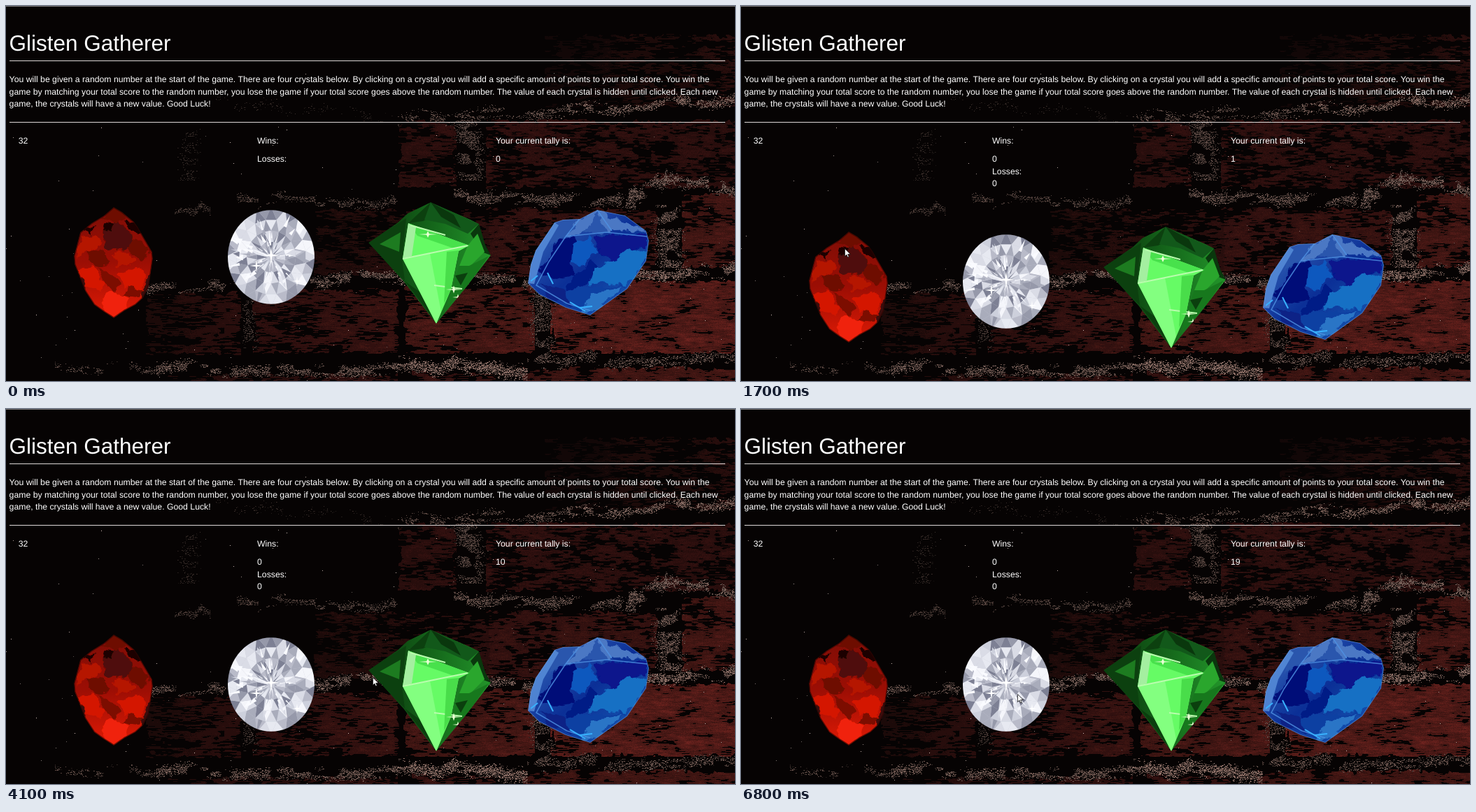
Recreate the animation shown at these times as an HTML page with a canvas. Size 1042 px wide and 537 px high, loop 8000 ms.

```html
<!DOCTYPE html>
<html lang="en">
<head>
<meta charset="utf-8">
<title>Glisten Gatherer</title>
<style>
  html, body { margin: 0; width: 100%; height: 100%; overflow: hidden; background: #060303; }
  canvas, svg { position: absolute; left: 0; top: 0; width: 1042px; height: 537px; }
  text { font: 12.25px "Liberation Sans", Arial, sans-serif; fill: #fff; text-rendering: geometricPrecision; }
  .title { font-size: 31.5px; }

  .early, .late, .one, .ten, .nineteen, #gems, #cursor { animation: 8s step-end -5ms infinite; }
  .early { animation-name: early; }
  .late { animation-name: late; }
  .one { animation-name: one; }
  .ten { animation-name: ten; }
  .nineteen { animation-name: nineteen; }
  #gems { animation-name: drop; }
  #cursor { animation-name: move; }

  @keyframes early { 0% { opacity: 1 } 21.25%, 100% { opacity: 0 } }
  @keyframes late { 0% { opacity: 0 } 21.25%, 100% { opacity: 1 } }
  @keyframes one { 0% { opacity: 0 } 21.25% { opacity: 1 } 43.75%, 100% { opacity: 0 } }
  @keyframes ten { 0% { opacity: 0 } 43.75% { opacity: 1 } 85%, 100% { opacity: 0 } }
  @keyframes nineteen { 0% { opacity: 0 } 85%, 100% { opacity: 1 } }
  @keyframes drop { 0% { transform: none } 21.25%, 100% { transform: translateY(35px) } }
  @keyframes move {
    0% { opacity: 0; transform: translate(88px, 4px) }
    1.25% { opacity: 1; transform: translate(88px, 4px); animation-timing-function: steps(4) }
    6.25% { opacity: 1; transform: translate(132px, 262px); animation-timing-function: steps(3) }
    10% { opacity: 1; transform: translate(148px, 347px) }
    26.25% { opacity: 1; transform: translate(168px, 351px); animation-timing-function: steps(4) }
    31.25% { opacity: 1; transform: translate(388px, 388px) }
    32.5% { opacity: 1; transform: translate(440px, 396px); animation-timing-function: steps(3) }
    36.25% { opacity: 1; transform: translate(559px, 376px) }
    37.5% { opacity: 1; transform: translate(538px, 373px); animation-timing-function: steps(3) }
    41.25% { opacity: 1; transform: translate(397px, 388px) }
    48.75% { opacity: 1; transform: translate(480px, 381px) }
    50% { opacity: 1; transform: translate(564px, 377px) }
    51.25% { opacity: 1; transform: translate(524px, 384px); animation-timing-function: steps(2) }
    53.75% { opacity: 1; transform: translate(346px, 405px) }
    56.25% { opacity: 1; transform: translate(354px, 407px) }
    58.75% { opacity: 1; transform: translate(363px, 408px) }
    60% { opacity: 1; transform: translate(371px, 409px) }
    63.75% { opacity: 1; transform: translate(377px, 409px) }
    65% { opacity: 1; transform: translate(382px, 409px) }
    67.5% { opacity: 1; transform: translate(383px, 409px) }
    72.5% { opacity: 1; transform: translate(385px, 409px); animation-timing-function: steps(3) }
    76.25% { opacity: 1; transform: translate(391px, 409px) }
    78.75%, 100% { opacity: 1; transform: translate(395px, 408px) }
  }
</style>
</head>
<body>
<canvas id="wall" width="1042" height="537"></canvas>
<svg viewBox="0 0 1042 537">
  <defs>
    <filter id="rough" x="-5%" y="-5%" width="110%" height="110%">
      <feTurbulence type="fractalNoise" baseFrequency=".07" numOctaves="3" seed="4"/>
      <feDisplacementMap in="SourceGraphic" scale="14" xChannelSelector="R" yChannelSelector="G"/>
    </filter>
    <linearGradient id="redTone" x1="0" y1="0" x2="0" y2="1">
      <stop offset="0" stop-color="#7d0d06"/><stop offset=".5" stop-color="#9c0e04"/><stop offset="1" stop-color="#e01a05"/>
    </linearGradient>
    <linearGradient id="greenTone" x1="0" y1="0" x2="1" y2="0">
      <stop offset="0" stop-color="#0a300b"/><stop offset=".5" stop-color="#14641a"/><stop offset="1" stop-color="#23952a"/>
    </linearGradient>
    <linearGradient id="blueTone" x1="0" y1="0" x2="1" y2="1">
      <stop offset="0" stop-color="#3d6fc0"/><stop offset=".5" stop-color="#0b2f96"/><stop offset="1" stop-color="#1a63ba"/>
    </linearGradient>
    <clipPath id="redClip"><path id="redEdge" d="M154 288 166 295 183 309 188 316 209 352 210 362 204 402 196 418 185 428 170 436 154 447 140 438 126 428 113 408 98 370 97 358 106 324 122 311 140 300Z"/></clipPath>
    <clipPath id="whiteClip"><ellipse cx="379" cy="359.5" rx="62" ry="67.3"/></clipPath>
    <clipPath id="greenClip"><path id="greenEdge" d="M607 281 664 306 676 312 685 342 693 357 660 400 615 455 568 394 518 339 560 310 574 297Z"/></clipPath>
    <clipPath id="blueClip"><path id="blueEdge" d="M845 292 885 300 915 322 919 336 915 365 888 405 835 443 800 432 762 413 746 397 750 370 757 350 784 310 796 306 820 305Z"/></clipPath>
    <path id="star" d="M0-8 1.2-1.2 8 0 1.2 1.2 0 8-1.2 1.2-8 0-1.2-1.2Z"/>
  </defs>

  <path fill="#777474" d="M0 0H1042V1H0Z"/>
  <path fill="#dcd8d7" d="M5 78H1028V79H5ZM5 166H1028V167H5Z"/>
  <text class="title" x="4.4" y="64">Glisten Gatherer</text>
  <text x="4.6" y="109">You will be given a random number at the start of the game. There are four crystals below. By clicking on a crystal you will add a specific amount of points to your total score. You win the</text>
  <text x="4.6" y="126.5">game by matching your total score to the random number, you lose the game if your total score goes above the random number. The value of each crystal is hidden until clicked. Each new</text>
  <text x="4.6" y="144">game, the crystals will have a new value. Good Luck!</text>
  <text x="17.8" y="197">32</text>
  <text x="359" y="197">Wins:</text>
  <text x="700" y="197">Your current tally is:</text>
  <text class="early" x="359" y="223">Losses:</text>
  <g class="late">
    <text x="359" y="223">0</text>
    <text x="359" y="240.5">Losses:</text>
    <text x="359" y="258">0</text>
  </g>
  <text class="early" x="700" y="223">0</text>
  <text class="one" x="700" y="223">1</text>
  <text class="ten" x="700" y="223">10</text>
  <text class="nineteen" x="700" y="223">19</text>

  <g id="gems">
    <g clip-path="url(#redClip)">
      <use href="#redEdge" fill="url(#redTone)"/>
      <g filter="url(#rough)">
        <path fill="#500d08" d="M140 318 158 304 174 320 186 342 160 352 138 344Z"/>
        <path fill="#1d0504" d="M170 306 188 312 193 326 178 322ZM140 309 152 312 148 324 138 320ZM112 318 128 314 122 326Z"/>
        <path fill="#6e0c05" d="M154 288 172 302 158 308 138 304ZM186 330 206 352 190 366 172 346ZM112 344 140 350 146 370 128 374Z"/>
        <path fill="#b51204" d="M106 330 128 328 134 344 112 352 100 364ZM150 356 176 352 184 368 160 374Z"/>
        <path fill="#d41604" d="M104 378 124 372 142 396 132 410 114 402ZM160 384 190 372 200 384 194 408 170 402Z"/>
        <path fill="#7c0c04" d="M132 374 144 378 162 398 156 408 140 394ZM176 404 200 408 190 418 166 416Z"/>
        <path fill="#f02008" d="M134 416 152 408 176 420 170 434 154 446 140 434Z"/>
        <path fill="#3b0a07" d="M204 384 212 380 206 416 190 430ZM100 372 106 384 114 408 104 396Z"/>
      </g>
      <use href="#redEdge" fill="none" stroke="#2b0603" stroke-opacity=".65" stroke-width="3"/>
    </g>

    <g id="diamond" clip-path="url(#whiteClip)"></g>

    <g clip-path="url(#greenClip)">
      <use href="#greenEdge" fill="url(#greenTone)"/>
      <path fill="#0c400f" d="M518 339 572 304 566 362 570 394ZM607 281 630 292 596 308 575 311Z"/>
      <path fill="#12581a" d="M607 281 676 312 660 326 628 312 598 306Z"/>
      <path fill="#0a370d" d="M607 281 640 299 650 318 622 302ZM676 312 693 357 680 352 664 326Z"/>
      <path fill="#2aa62d" d="M660 343 674 326 684 352 662 374 648 372Z"/>
      <path fill="#17781d" d="M648 372 662 372 690 358 655 407 630 430Z"/>
      <path fill="#1d7b20" d="M534 341 564 324 562 352Z"/>
      <path fill="#0b3f0e" d="M642 386 660 382 650 400ZM570 394 592 410 612 450Z"/>
      <path fill="#66fb65" d="M575 311 662 343 647 351 636 406 615 455 567 362Z"/>
      <path fill="#48e14c" d="M575 311 662 343 640 347 588 329Z"/>
      <path fill="#a4efa0" d="M575 311 586 317 580 358 567 362Z"/>
      <path fill="#83ff80" d="M567 362 606 354 622 438 615 455Z"/>
      <path fill="none" stroke="#bafcae" stroke-width="2" d="M567 362 660 343M578 314 628 328M612 400 652 405"/>
      <path fill="#49dd4a" d="M630 352 647 350 636 406 626 426Z"/>
      <g fill="#e9ffd4">
        <use href="#star" transform="translate(603 327) scale(1.6 .6)"/>
        <use href="#star" transform="translate(640 406) scale(1.4 .7)"/>
        <use href="#star" transform="translate(646 417) scale(1 .6)"/>
      </g>
    </g>

    <g clip-path="url(#blueClip)">
      <use href="#blueEdge" fill="url(#blueTone)"/>
      <g filter="url(#rough)">
        <path fill="#4b78c4" d="M820 305 845 292 915 322 868 324 832 322 800 330Z"/>
        <path fill="#2956ad" d="M845 292 858 324 826 326ZM784 310 820 306 800 330 776 344Z"/>
        <path fill="#030d78" d="M786 338 812 328 822 346 806 366 812 386 788 392 764 384Z"/>
        <path fill="#07158c" d="M838 330 890 328 916 326 916 346 888 348 866 366 848 352Z"/>
        <path fill="#0f58be" d="M808 342 832 330 846 350 826 372 806 366Z"/>
        <path fill="#061a86" d="M812 386 838 366 850 376 826 402 796 410Z"/>
        <path fill="#1470c4" d="M866 366 890 346 917 354 908 378 884 402 852 396 832 400 840 376Z"/>
        <path fill="#0b3fa2" d="M790 410 830 402 884 402 850 430 820 436Z"/>
        <path fill="#2b74c6" d="M838 410 880 404 846 434 822 440Z"/>
        <path fill="#0a2386" d="M764 398 796 408 812 430 774 418Z"/>
      </g>
      <path fill="#5a91dc" fill-opacity=".8" d="M784 310 790 314 768 352 755 398 746 397 750 370 757 350Z"/>
      <path fill="none" stroke="#4f93e4" stroke-width="1.6" stroke-opacity=".8" d="M800 330 776 366 758 400 802 426 835 436M800 330 858 324 916 330M820 305 800 330M845 292 866 322"/>
      <path fill="none" stroke="#38b1ff" stroke-width="2" d="M750 394 760 386M774 382 782 398M806 424 828 437M820 432 838 430"/>
      <use href="#blueEdge" fill="none" stroke="#6797d8" stroke-opacity=".55" stroke-width="2"/>
    </g>
  </g>

  <path id="cursor" fill="#fff" stroke="#111" stroke-width=".8" d="M.4.5V11.6L2.9 9.2 4.6 13 6.3 12.2 4.7 8.6H8.4Z"/>
</svg>
<script>
const W = 1042, H = 537;

// Seeded randomness and value noise
let seed = 7;
const rnd = () => (seed = (Math.imul(seed, 1664525) + 1013904223) >>> 0) / 4294967296;
const hash = (x, y) => {
  let n = Math.imul(x, 374761393) + Math.imul(y, 668265263);
  n = Math.imul(n ^ n >>> 13, 1274126177);
  return ((n ^ n >>> 16) >>> 0) / 4294967296;
};
const mix = (a, b, t) => a + (b - a) * t;
const noise = (x, y) => {
  const i = Math.floor(x), j = Math.floor(y);
  const u = (x - i) ** 2 * (3 - 2 * (x - i)), v = (y - j) ** 2 * (3 - 2 * (y - j));
  return mix(mix(hash(i, j), hash(i + 1, j), u), mix(hash(i, j + 1), hash(i + 1, j + 1), u), v);
};
const fbm = (x, y) => .6 * noise(x, y) + .4 * noise(x * 2.7 + 9, y * 2.7);

const ctx = document.getElementById('wall').getContext('2d');
ctx.fillStyle = '#060303';
ctx.fillRect(0, 0, W, H);
const img = ctx.getImageData(0, 0, W, H);
const plot = (x, y, r, g, b) => {
  x |= 0; y |= 0;
  if (x < 0 || y < 0 || x >= W || y >= H) return;
  const k = (y * W + x) * 4;
  img.data[k] = r; img.data[k + 1] = g; img.data[k + 2] = b;
};

// Bricks: left, top, right, bottom, light at the left and right end
const bricks = [
  [770, 40, 1060, 145, .02, .3],
  [560, 162, 644, 260, .3, .38],
  [686, 162, 1060, 262, .38, .34],
  [440, 290, 735, 386, .2, .36],
  [690, 288, 932, 388, .42, .5],
  [966, 268, 1060, 376, .62, .6],
  [200, 408, 336, 500, .18, .32],
  [352, 404, 562, 498, .34, .5],
  [568, 400, 756, 498, .62, .68],
  [778, 392, 1060, 498, .86, .8],
  [225, 526, 560, 560, .24, .4],
  [580, 522, 700, 560, .45, .5],
  [735, 516, 1060, 560, .55, .66]
];
for (const [x0, y0, x1, y1, a, b] of bricks) {
  for (let y = y0; y < Math.min(y1, H); y++) for (let x = x0; x < Math.min(x1, W); x++) {
    const edge = Math.min(x - x0, x1 - x, y - y0, y1 - y);
    if (edge + 16 * (fbm(x * .09, y * .09) - .6) < 0) continue;
    const light = mix(a, b, (x - x0) / (x1 - x0));
    const n = .6 * fbm(x * .035, y * .09) + .4 * noise(x * .12, y * .7);
    if (n < .56 - light * .25) continue;
    const v = Math.ceil(light * (n + .3) * (.85 + .3 * hash(x, y)) * 9) / 9;
    plot(x, y, 8 + 92 * v, 4 + 28 * v, 4 + 24 * v);
  }
}

// Mortar: from, to, spread, grains, light
const mortar = [
  [560, 160, 800, 152, 8, 1300, .5],
  [800, 152, 1042, 136, 8, 1800, .62],
  [300, 140, 560, 158, 8, 260, .25],
  [660, 164, 664, 250, 18, 1700, .42],
  [262, 175, 262, 250, 14, 330, .24],
  [240, 293, 292, 290, 6, 240, .35],
  [330, 276, 560, 282, 7, 1300, .4],
  [640, 270, 900, 284, 9, 2200, .52],
  [890, 278, 945, 246, 10, 800, .55],
  [940, 246, 1042, 264, 8, 1000, .58],
  [944, 285, 950, 375, 18, 1800, .55],
  [200, 404, 335, 402, 7, 1000, .48],
  [435, 398, 560, 388, 8, 1300, .55],
  [560, 394, 775, 396, 8, 1600, .58],
  [880, 388, 1042, 378, 8, 1600, .66],
  [346, 408, 348, 490, 10, 380, .35],
  [766, 405, 766, 505, 16, 1200, .45],
  [70, 520, 220, 518, 6, 420, .42],
  [215, 520, 560, 518, 8, 2800, .55],
  [560, 514, 745, 520, 10, 2200, .68],
  [745, 506, 1042, 508, 9, 1600, .5]
];
for (const [x0, y0, x1, y1, spread, grains, light] of mortar) {
  const flat = Math.abs(x1 - x0) > Math.abs(y1 - y0);
  for (let i = 0; i < grains; i++) {
    const t = rnd(), off = (rnd() + rnd() + rnd() - 1.5) * spread;
    const x = mix(x0, x1, t) + (flat ? 0 : off);
    const y = mix(y0, y1, t) + (flat ? off + 12 * (noise(x0 + t * 7, y0) - .5) : 0);
    if (noise(x * .06, y * .13) < .38) continue;
    const c = light * (.4 + .9 * rnd());
    plot(x, y, 205 * c, 165 * c, 152 * c);
    if (rnd() < .45) plot(x + 1, y, 150 * c, 112 * c, 102 * c);
  }
}
for (let i = 0; i < 120; i++) {
  const c = 90 + 130 * rnd();
  plot(W * rnd(), H * Math.sqrt(rnd()), c, c * .9, c * .87);
}
ctx.putImageData(img, 0, 0);

// Round diamond: rings of split facets
const diamond = document.getElementById('diamond');
const greys = ['#f5f6fb', '#dadce6', '#b9bbc9', '#9699aa', '#cdd0dc', '#e7e9f1', '#a9acbb', '#7d8094'];
const add = (d, fill) => {
  const p = document.createElementNS('http://www.w3.org/2000/svg', 'path');
  p.setAttribute('d', d);
  p.setAttribute('fill', fill);
  diamond.append(p);
};
const at = (r, a) => `${(379 + 64 * r * Math.cos(a)).toFixed(1)} ${(359.5 + 69 * r * Math.sin(a)).toFixed(1)}`;
const pick = () => greys[rnd() * greys.length | 0];
add('M315 290H443V430H315Z', '#c8cad6');
const rings = [.08, .32, .55, .78, 1.04], step = Math.PI / 10;
for (let k = 0; k < 4; k++) for (let s = 0; s < 20; s++) {
  const a = (s + k / 2) * step;
  const [p, q, m] = [at(rings[k], a), at(rings[k], a + step), at(rings[k + 1], a + step / 2)];
  add(`M${p}L${q}L${m}Z`, pick());
  add(`M${q}L${m}L${at(rings[k + 1], a + step * 1.5)}Z`, pick());
}
for (let i = 0; i < 60; i++) {
  const a = rnd() * 2 * Math.PI, r = .1 + .7 * rnd(), w = .03 + .07 * rnd();
  add(`M${at(r, a - w)}L${at(r + .1 + .2 * rnd(), a)}L${at(r, a + w)}Z`, rnd() < .6 ? '#fafbff' : pick());
}
for (const [x, y, s] of [[379, 357, 1.5], [358, 372, 1.2], [416, 394, .9]])
  add(`M${x} ${y - 8 * s}l${s} ${7 * s} ${7 * s} ${s} ${-7 * s} ${s} ${-s} ${7 * s} ${-s} ${-7 * s} ${-7 * s} ${-s} ${7 * s} ${-s}Z`, '#fff');
</script>
</body>
</html>
```
